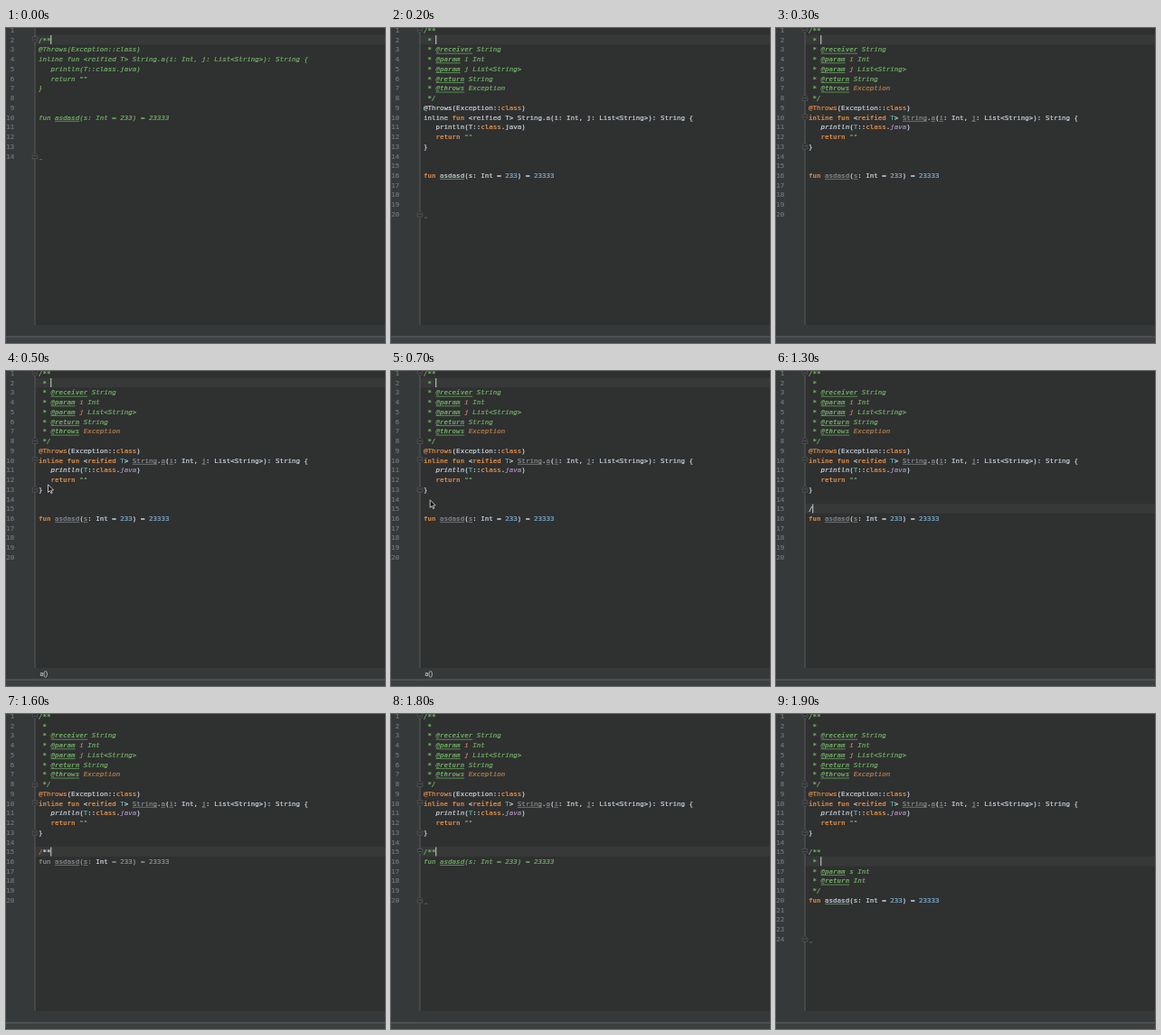
An HTML page with a canvas that plays this animation: 419x349 px, repeating every 2 s.

```html
<!DOCTYPE html>
<html lang="en">
<head>
<meta charset="utf-8">
<title>Doc comment completion</title>
<style>
  html, body { margin: 0; width: 100%; height: 100%; overflow: hidden; background: #2f3030; }
  canvas { display: block; width: 419px; height: 349px; }
</style>
</head>
<body>
<canvas id="stage"></canvas>
<script>
const W = 419, H = 349, LOOP = 2000;
const LEFT = 36, CHAR = 4.515, ROW = 10.73, FOLD_X = 32;
const MONO = '"DejaVu Sans Mono", monospace';

const canvas = document.getElementById('stage');
const ctx = canvas.getContext('2d');
const dpr = window.devicePixelRatio || 1;
canvas.width = Math.round(W * dpr);
canvas.height = Math.round(H * dpr);

const DOC = '#6fac64';
// Each key is the letter that follows "~" in a line of code.
const STYLES = {
  t: { color: '#c3ced8' },
  k: { color: '#d68a48', bold: true },
  n: { color: '#7badcd' },
  s: { color: '#7a9c68' },
  a: { color: '#d68a48' },
  y: { color: '#4fb0ae' },
  f: { color: '#c3ced8', italic: true },
  p: { color: '#a78bb8', italic: true },
  d: { color: DOC, italic: true },
  g: { color: DOC, italic: true, bold: true, line: true },
  r: { color: '#c0806a', italic: true },
  e: { color: '#b07c4c', italic: true },
  u: { color: '#858a8e', line: true },
  w: { color: '#c3ced8', line: DOC },
  m: { color: '#8d9193' },
  x: { color: '#c2694f' }
};

const docBlock = (param, ref) => [
  '~d/**', '~d *',
  '~d * ~g@receiver~d String',
  `~d * ~g@param~d ${param}i~d Int`,
  `~d * ~g@param~d ${param}j~d List<String>`,
  '~d * ~g@return~d String',
  `~d * ~g@throws~d ${ref}Exception`,
  '~d */'
];

const rawBody = [
  '~t@Throws(Exception::~kclass~t)',
  '~tinline ~kfun ~t<reified T> String.a(i: Int, j: List<String>): String {',
  '~t   println(T::~kclass~t.java)',
  '~k   return ~s""',
  '~t}'
];
const body = [
  '~a@Throws~t(Exception::~kclass~t)',
  '~kinline fun ~t<~kreified ~yT~t> ~uString~t.~ua~t(~ui~t: Int, ~uj~t: List<String>): String {',
  '~f   println~t(~yT~t::~kclass~t.~pjava~t)',
  '~k   return ~s""',
  '~t}'
];
const rawFun = '~kfun ~wasdasd~t(s: Int = ~n233~t) = ~n23333';
const fun = '~kfun ~uasdasd~t(~us~t: Int = ~n233~t) = ~n23333';
const mutedFun = '~mfun ~uasdasd~m(~us~m: ~tInt ~m= 233) = 23333';

const rawDoc = docBlock('~d', '~d');
const doc = docBlock('~r', '~e');
const top14 = [...doc, ...body, ''];
const FOLDS = [[1, 1], [8, -1], [10, 1], [13, -1]];

const typing = (from, text, cols, last = fun) => ({
  from, count: 20, lines: [...top14, text, last], folds: FOLDS, caret: [15, cols]
});

const SCENES = [
  { from: 0, count: 14, lines: ['', '~d/**', ...rawBody, '', '', rawFun], greenFrom: 2,
    folds: [[2, 1], [14, -1]], caret: [2, 3], end: 14 },
  { from: 100, count: 20, lines: [...rawDoc, ...rawBody, '', '', rawFun],
    folds: [[1, 1], [20, -1]], caret: [2, 3], end: 20 },
  { from: 300, count: 20, lines: [...top14, '', fun], folds: FOLDS, caret: [2, 3] },
  { from: 400, count: 20, lines: [...top14, '', fun], folds: FOLDS, caret: [2, 3], crumb: 'a()' },
  typing(800, '', 0),
  typing(1300, '~t/', 1),
  typing(1500, '~x/~t*', 2, mutedFun),
  typing(1600, '~x/~t**', 3, mutedFun),
  { from: 1700, count: 20, lines: [...top14, '~d/**', rawFun], greenFrom: 15,
    folds: [...FOLDS, [15, 1], [20, -1]], caret: [15, 3], end: 20 },
  { from: 1900, count: 24,
    lines: [...top14, '~d/**', '~d *', '~d * ~g@param~d s Int', '~d * ~g@return~d Int', '~d */', rawFun],
    folds: [...FOLDS, [15, 1], [24, -1]], caret: [16, 3], end: 24 }
];

const middle = row => 13 + (row - 2) * ROW;
const baseline = row => middle(row) + 2.75;

function rect(color, x, y, w, h) {
  ctx.fillStyle = color;
  ctx.fillRect(x, y, w, h);
}

// Large type scaled down keeps fractional letter widths; the outline adds weight.
function text(str, x, y, color, { size = 7.5, family = MONO, look = '', weight = 0.25 } = {}) {
  ctx.save();
  ctx.translate(x, y);
  ctx.scale(0.1, 0.1);
  ctx.font = `${look} ${size * 10}px ${family}`;
  ctx.fillStyle = ctx.strokeStyle = color;
  ctx.lineWidth = weight * 10;
  ctx.lineJoin = 'round';
  ctx.fillText(str, 0, 0);
  if (weight) ctx.strokeText(str, 0, 0);
  ctx.restore();
}

function codeLine(line, row, green) {
  let col = 0;
  for (const part of line.split('~').slice(1)) {
    const style = STYLES[part[0]], str = part.slice(1);
    const color = green ? DOC : style.color;
    const bold = style.bold && !green;
    const look = (green || style.italic ? 'italic ' : '') + (bold ? 'bold' : '');
    const x = LEFT + col * CHAR, y = baseline(row);
    text(str, x, y, color, { look, weight: bold ? 0 : 0.25 });
    if (style.line) {
      rect(style.line === true ? color : style.line, x, y + 1.3, str.length * CHAR, 0.7);
    }
    col += str.length;
  }
}

function foldMark(row, dir) {
  const y = middle(row);
  ctx.beginPath();
  ctx.moveTo(FOLD_X - 2.8, y - 3 * dir);
  ctx.lineTo(FOLD_X + 2.8, y - 3 * dir);
  ctx.lineTo(FOLD_X + 2.8, y + 1 * dir);
  ctx.lineTo(FOLD_X, y + 3.6 * dir);
  ctx.lineTo(FOLD_X - 2.8, y + 1 * dir);
  ctx.closePath();
  ctx.fillStyle = '#303131';
  ctx.fill();
  ctx.strokeStyle = '#5a5d5f';
  ctx.lineWidth = 0.7;
  ctx.stroke();
  rect('#6c6f71', FOLD_X - 1.5, y - 0.4, 3, 0.7);
}

function pointer(t) {
  if (t < 400 || t >= 1300) return;
  const p = Math.min(1, Math.max(0, (t - 500) / 300));
  ctx.save();
  ctx.translate(46.5 - 5 * p, 125.8 + 25.5 * p);
  ctx.beginPath();
  [[0, 0], [0, 8.6], [2, 6.8], [3.4, 9.8], [4.7, 9.2], [3.4, 6.3], [6, 6.1]]
    .forEach(([x, y]) => ctx.lineTo(x, y));
  ctx.closePath();
  ctx.fillStyle = '#111';
  ctx.fill();
  ctx.strokeStyle = '#e4e4e4';
  ctx.lineWidth = 0.8;
  ctx.stroke();
  ctx.restore();
}

function draw(t) {
  const scene = SCENES.filter(s => s.from <= t).pop();
  const [caretRow, caretCol] = scene.caret;
  ctx.setTransform(dpr, 0, 0, dpr, 0, 0);

  rect('#2f3030', 0, 0, W, H);
  rect('#353939', 0, 0, FOLD_X, H);
  rect('#373838', FOLD_X, middle(caretRow) - ROW / 2, W, ROW);
  rect('#585b5c', FOLD_X - 0.5, 0, 1, 329);

  for (let n = 1; n <= scene.count; n++) {
    const label = String(n);
    text(label, 9.3 - label.length * CHAR, baseline(n), '#74787b', { weight: 0.15 });
  }
  scene.folds.forEach(([row, dir]) => foldMark(row, dir));
  scene.lines.forEach((line, i) => codeLine(line, i + 1, i + 1 >= scene.greenFrom));
  if (scene.end) rect('#6c6f71', 37, baseline(scene.end) + 0.8, 3.2, 0.8);

  rect('#d0d0d0', LEFT + caretCol * CHAR - 0.3, middle(caretRow) - 5, 1, 10);

  rect('#35393a', 0, 329, W, 13);
  if (scene.crumb) {
    text(scene.crumb, 37.5, 338.2, '#c2c4c5', { size: 7, family: 'Roboto, sans-serif', weight: 0.15 });
  }
  rect('#5a6164', 0, 341.5, W, 1.3);
  rect('#3c4041', 0, 342.8, W, H - 342.8);

  pointer(t);
}

const start = performance.now();
function tick() {
  const t = (performance.now() - start) % LOOP;
  draw(Math.floor(t / 100) * 100);
  requestAnimationFrame(tick);
}
tick();
</script>
</body>
</html>
```
